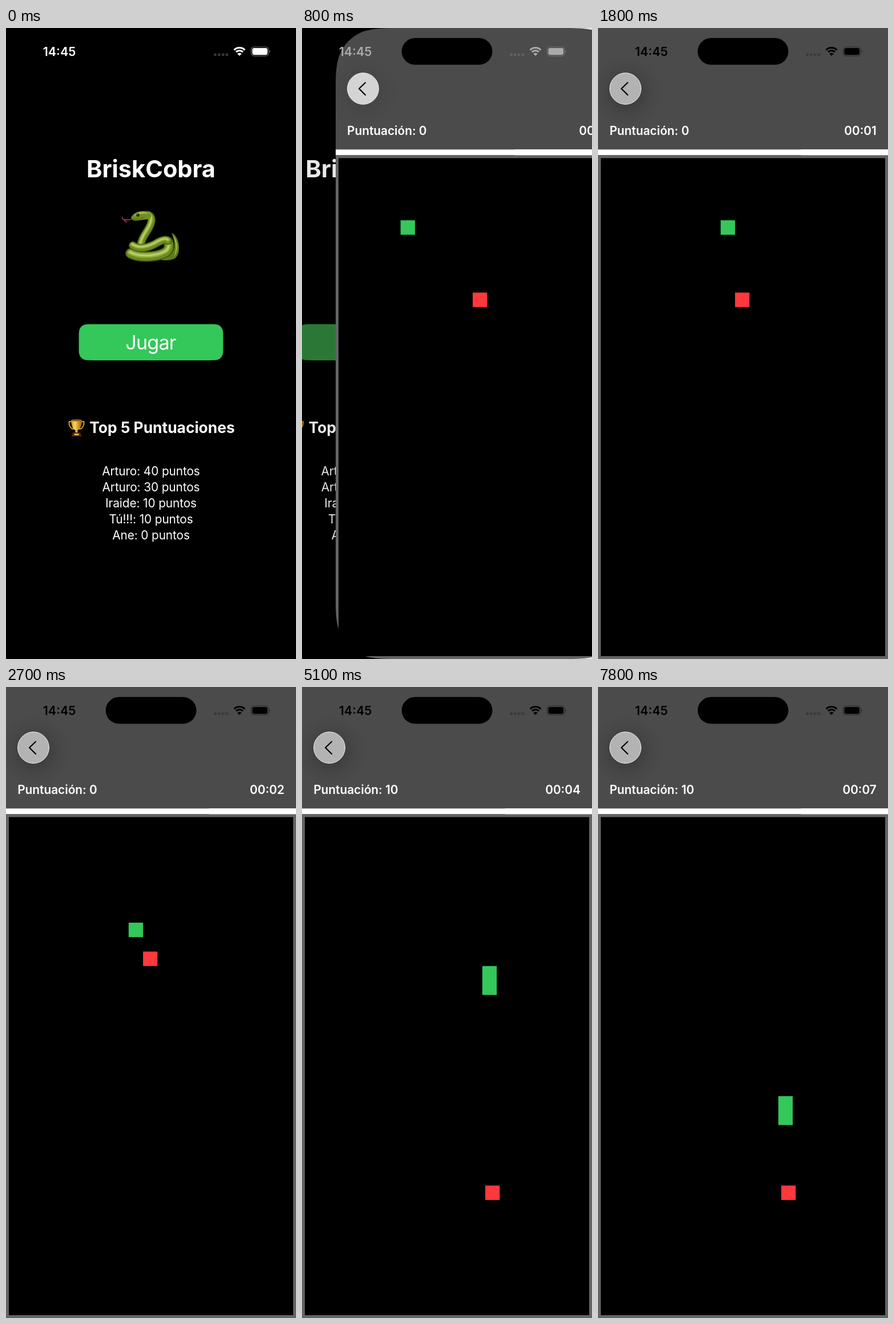
Animation of 508 by 1103 pixels, one loop 8000 ms. Source, as an HTML page:

```html
<!DOCTYPE html>
<html lang="es">
<head>
<meta charset="utf-8">
<style>
html, body { margin: 0; width: 100%; height: 100%; overflow: hidden; background: #000; }
svg { display: block; width: 508px; height: 1103px; }
text { font-family: Inter, Roboto, sans-serif; font-size: 20.8px; fill: #fff; }
.mid { text-anchor: middle; }
.semi { font-weight: 600; }
.bold { font-weight: 700; }
</style>
</head>
<body>
<svg id="stage" viewBox="0 0 508 1103" xmlns="http://www.w3.org/2000/svg"></svg>
<script>
const LOOP = 8000, STEP = 100, W = 508, H = 1103;
const CELL = 25.27, X0 = 113.73, Y0 = 336.14;
const PUSH = 623.7, STIFF = 0.021;
const GREEN = '#34c759';

const scores = ['Arturo: 40', 'Arturo: 30', 'Iraide: 10', 'Tú!!!: 10', 'Ane: 0'];

// Rectangle with smooth corners, built from one corner turned four times
const corner = [[0, 1.529], [0, 1.088], [0, .868], [.075, .631], [.169, .373],
  [.373, .169], [.631, .075], [.868, 0], [1.088, 0], [1.529, 0]];
function smooth(x, y, w, h, r) {
  const turns = [
    (u, v) => [u, v],
    (u, v) => [w - v, u],
    (u, v) => [w - u, h - v],
    (u, v) => [v, h - u]
  ];
  return turns.map((turn, i) => {
    const p = corner.map(([u, v]) => {
      const [a, b] = turn(u * r, v * r);
      return `${x + a} ${y + b}`;
    });
    return `${i ? 'L' : 'M'}${p[0]}C${p.slice(1).join(' ')}`;
  }).join('') + 'Z';
}

const stroke = (d, w, color) =>
  `<path d="${d}" fill="none" stroke="${color}" stroke-width="${w}" stroke-linecap="round" stroke-linejoin="round"/>`;

// Shaded round body segment
const tube = (d, w) =>
  stroke(d, w, '#435a10') + stroke(d, w * .8, '#6b8a20') +
  `<g transform="translate(-.6 -2)">${stroke(d, w * .48, '#8fab38')}${stroke(d, w * .2, '#b9cd6b')}</g>`;

const serpent = `
  <path d="M290 358C303 363 308 391 297 402C290 407 275 407 266 404C286 402 296 392 295 378C295 370 292 364 290 358Z" fill="#5f7b1b"/>
  <path d="M292 362C302 371 303 390 294 400C299 388 298 374 292 362Z" fill="#9ab441"/>
  ${tube('M238 328C256 322 258 335 251 348C246 359 238 365 236 379', 14)}
  ${tube('M218 394C232 402 262 401 278 393C286 389 287 380 284 374', 18)}
  ${tube('M222 380C233 388 250 384 262 377C272 371 280 368 284 372', 14)}
  <path d="M219 332C222 323 234 318 246 321C256 324 257 332 249 334C240 335 230 338 222 336Z" fill="#718f22"/>
  <path d="M224 328C230 321 242 319 250 325C242 323 233 325 224 328Z" fill="#a5bf4a"/>
  ${stroke('M221 334C230 335 237 334 242 331', 1, '#45590f')}
  <circle cx="231" cy="327" r="2.8" fill="#1b2208"/><circle cx="230.3" cy="326.2" r=".8" fill="#dfe8b0"/>
  ${stroke('M220 334C215 337 211 335 209 335M209 335C205 336 204 334 204 331M209 335C207 338 209 339 212 339', 1.4, '#b24a50')}`;

const trophy = `
  ${stroke('M116 688H110.500C110 695 113 700 118 701M131 688H136.500C137 695 134 700 129 701', 2.2, '#cf951f')}
  <path d="M114 685H133C133 696 129 702 125.500 703V708H121.500V703C118 702 114 696 114 685Z" fill="url(#gold)"/>
  <ellipse cx="123.500" cy="685.500" rx="9.500" ry="1.700" fill="#8a5a10"/>
  <path d="M117 707H130L132.500 714H114.500Z" fill="#5a2318"/>
  <rect x="119.500" y="709" width="8" height="3" fill="#e0ae3c"/>`;

const arc = r => {
  const k = r * .707;
  return `M${409 - k} ${48 - k}A${r} ${r} 0 0 1 ${409 + k} ${48 - k}`;
};
const wifi = [13.4, 8.6].map(r =>
  `<path d="${arc(r)}" fill="none" stroke="currentColor" stroke-width="3"/>`).join('') +
  '<path d="M409 48.800L405.200 45A5.400 5.400 0 0 1 412.800 45Z" fill="currentColor"/>';

const dots = [0, 1, 2, 3].map(i =>
  `<rect x="${364.3 + i * 6.8}" y="44.300" width="4.600" height="4.600" rx="1.600"/>`).join('');

const stage = document.getElementById('stage');
stage.innerHTML = `
  <defs>
    <clipPath id="screen"><path id="mask"/></clipPath>
    <linearGradient id="gold">
      <stop offset="0" stop-color="#c98a18"/><stop offset=".35" stop-color="#f7d568"/>
      <stop offset=".65" stop-color="#d99a22"/><stop offset="1" stop-color="#9a6512"/>
    </linearGradient>
    <radialGradient id="shade">
      <stop offset=".35" stop-color="#000" stop-opacity=".16"/>
      <stop offset=".65" stop-color="#000" stop-opacity=".06"/>
      <stop offset="1" stop-color="#000" stop-opacity="0"/>
    </radialGradient>
  </defs>
  <rect width="${W}" height="${H}" fill="#e4e4e4"/>
  <g id="menu"><g clip-path="url(#screen)">
    <rect width="${W}" height="${H}"/>
    <text class="mid bold" x="254" y="261" style="font-size:41.5px">BriskCobra</text>
    ${serpent}
    <path id="button" d="${smooth(127.6, 517.7, 252.8, 63.2, 15)}"/>
    <text id="play" class="mid" x="253.500" y="562" style="font-size:34.2px;letter-spacing:-.025em">Jugar</text>
    ${trophy}
    <text class="mid bold" x="273.500" y="708" style="font-size:26.4px">Top 5 Puntuaciones</text>
    ${scores.map((s, i) => `<text class="mid" x="254" y="${781.5 + i * 28.2}" style="letter-spacing:-.005em">${s} puntos</text>`).join('')}
    <rect id="dim" width="${W}" height="${H}"/>
  </g></g>
  <g id="game"><g clip-path="url(#screen)">
    <rect width="${W}" height="212.300" fill="#4b4b4b"/>
    <circle id="shadow" cx="50" cy="112" r="64" fill="url(#shade)"/>
    <circle id="back" cx="48" cy="106" r="27.400" stroke="#f2f2f2"/>
    ${stroke('M52 95.500L41 106L52 117', 2.2, '#000')}
    <text id="score" class="semi" x="20.200" y="187.300"></text>
    <text id="clock" class="semi" x="487.800" y="187.300" text-anchor="end"></text>
    <rect y="212.300" width="${W}" height="10.100" fill="#fff"/>
    <rect x="2.500" y="224.900" width="503" height="875.600" stroke="#636366" stroke-width="5.050"/>
    <rect id="food" width="${CELL}" height="${CELL}" fill="#ff383c"/>
    <rect id="snake" fill="${GREEN}"/>
  </g></g>
  <rect x="174.600" y="17.600" width="158.900" height="46.600" rx="23.300"/>
  <g id="status" fill="currentColor">
    <text class="semi" x="64.800" y="48.800" style="fill:currentColor;font-size:21.4px">14:45</text>
    <g opacity=".22">${dots}</g>
    ${wifi}
    <rect x="429.500" y="33" width="30.500" height="15.800" rx="5" fill="none" stroke="currentColor" stroke-width="1.200" opacity=".42"/>
    <rect x="431.400" y="34.900" width="26.700" height="12" rx="3.400"/>
    <path d="M461.500 38.500Q463.800 40.900 461.500 43.400Z" opacity=".5"/>
  </g>`;

const ui = {};
stage.querySelectorAll('[id]').forEach(e => ui[e.id] = e);

const set = (el, attrs) => { for (const k in attrs) el.setAttribute(k, attrs[k]); };
const clamp = v => Math.min(1, Math.max(0, v));
const mix = (a, b, k) => `rgb(${a.map((v, i) => Math.round(v + (b[i] - v) * k))})`;
const gray = (a, b, k) => mix([a, a, a], [b, b, b], k);

// Column and row of the head after n moves: right, down, right, down
function cellAt(n) {
  if (n <= 4) return [n, 0];
  if (n <= 9) return [4, n - 4];
  if (n <= 13) return [n - 5, 5];
  return [8, n - 8];
}

function drawSnake(n) {
  const [c, r] = cellAt(n);
  const [pc, pr] = n >= 10 ? cellAt(n - 1) : [c, r];
  set(ui.snake, {
    x: X0 + Math.min(c, pc) * CELL,
    y: Y0 + Math.min(r, pr) * CELL,
    width: CELL * (1 + Math.abs(c - pc)),
    height: CELL * (1 + Math.abs(r - pr))
  });
}

function draw(time) {
  const t = Math.floor(time / STEP) * STEP;

  // Critically damped push
  const s = Math.max(0, t - PUSH) * STIFF;
  const left = t >= 1200 ? 0 : W * (1 + s) * Math.exp(-s);
  const moving = t >= 700 && t < 1200;
  const done = 1 - left / W;
  set(ui.menu, { transform: `translate(${-.3 * (W - left)} 0)` });
  set(ui.game, { transform: `translate(${left} 0)`, visibility: t < 700 ? 'hidden' : 'visible' });
  set(ui.mask, { d: smooth(0, 0, W, H, moving ? 78.3 : 0) });
  set(ui.dim, { opacity: .1 * done });

  const lit = t < 500 ? 1 : clamp((t - 700) / 200);
  set(ui.button, { fill: mix([41, 65, 29], [52, 199, 89], lit) });
  ui.play.style.fill = mix([102, 134, 112], [255, 255, 255], lit);

  const k = clamp((t - 700) / 300);
  ui.status.style.color = gray(255, 0, k);
  set(ui.back, { fill: gray(229, 179, k) });
  set(ui.shadow, { opacity: .2 + .8 * k });

  const moves = Math.max(0, Math.floor((t - 600) / 300));
  const eaten = moves >= 10;
  drawSnake(moves);
  set(ui.food, eaten ? { x: 321, y: 871.5 } : { x: X0 + 5 * CELL, y: Y0 + 5 * CELL });
  ui.score.textContent = 'Puntuación: ' + (eaten ? 10 : 0);
  ui.clock.textContent = '00:0' + Math.max(0, Math.floor((t - 600) / 1000));
}

const start = performance.now();
function tick() {
  draw((performance.now() - start) % LOOP);
  requestAnimationFrame(tick);
}
tick();
</script>
</body>
</html>
```
